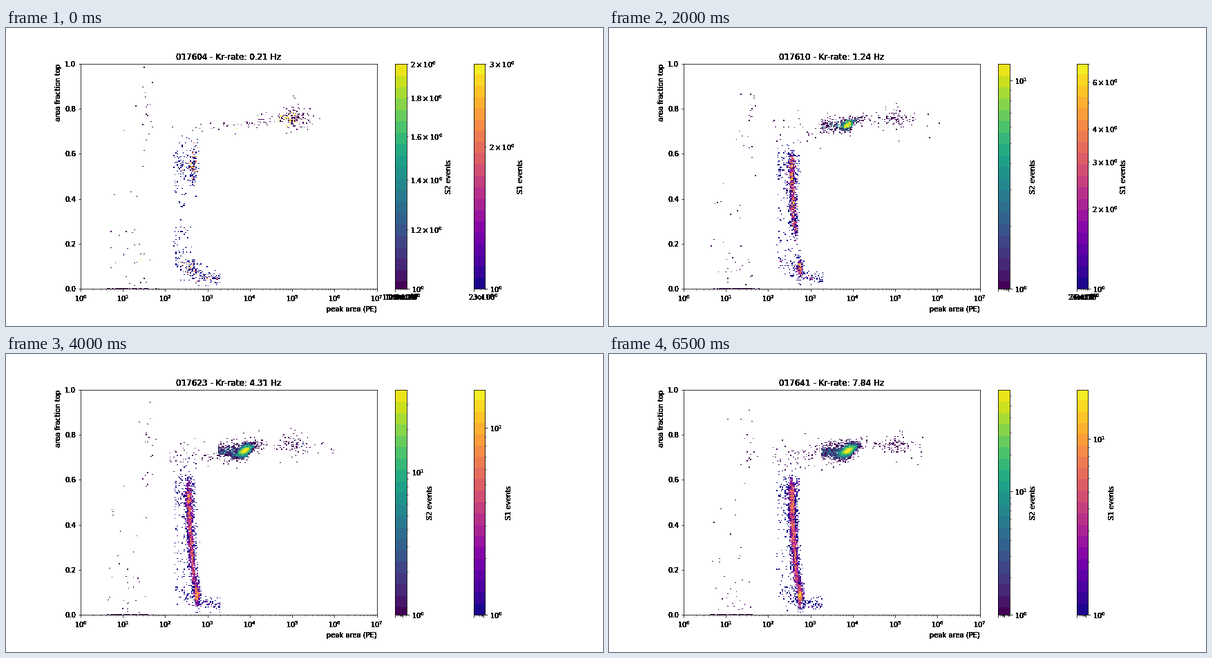
A matplotlib script for the animation above (7000 ms loop, 864x432 px).

```python
import numpy as np
import matplotlib.pyplot as plt
from matplotlib.animation import FuncAnimation
from matplotlib.text import Text

W, H = 864, 432
FRAMES, STEP = 14, 500
BINS = 250

plt.rcParams.update({"font.family": "DejaVu Sans", "font.size": 10})

# Key moments: run number, rate and the largest count in each histogram
KEYS = [0, 1, 2, 4, 6, 8, 10, 13]
RUN = [17604, 17605, 17607, 17610, 17616, 17623, 17629, 17641]
RATE = [.21, .25, .43, 1.24, 2.64, 4.31, 5.83, 7.84]
TOP_S2 = [2, 2, 5, 12, 29, 38, 55, 67]
TOP_S1 = [3, 3, 4, 7, 14, 16, 21, 19]


def top_count(tops, i):
    """Largest count, growing geometrically between key moments."""
    return int(np.exp(np.interp(i, KEYS, np.log(tops))) + 0.01)


def solid(img, dpi):
    """Hard-edged text: every touched pixel becomes opaque."""
    img[..., 3] = img[..., 3] > 0.06
    return img, 0, 0


class Sampler:
    """Seeded point clouds; x is log10(area), y the area fraction."""

    def __init__(self, seed):
        self.rng = np.random.default_rng(seed)

    def noise(self, n, sd):
        """Bell curve with a sharp core and a wide halo."""
        return self.rng.normal(0, sd, n) * self.rng.uniform(0.4, 1.6, n)

    def cloud(self, n, x, sx, y, sy, tilt=0):
        n = int(n)
        dx = self.noise(n, sx)
        return x + dx, y + tilt * dx + self.noise(n, sy)

    def box(self, n, x0, x1, y0, y1):
        n = int(n)
        return self.rng.uniform(x0, x1, n), self.rng.uniform(y0, y1, n)

    def band(self, n, x0, x1, y0, y1, sy):
        """Points along a straight line with vertical spread."""
        t = self.rng.uniform(0, 1, int(n))
        return x0 + (x1 - x0) * t, y0 + (y1 - y0) * t + self.noise(t.size, sy)

    def column(self, n, low):
        u = self.rng.uniform(0, 1, int(n)) ** 0.85
        y = low + (0.58 - low) * u + self.rng.normal(0, 0.022, u.size)
        x = 2.525 + 0.3 * np.exp(-4.2 * y) + 0.015 * (0.6 - y)
        return x + self.noise(u.size, 0.043), y

    def floor(self):
        """Broken row of single events at zero."""
        x = np.arange(0.62, 1.85, 7 / BINS)
        keep = self.rng.uniform(0, 1, x.size) < np.where(x < 1.58, 0.8, 0.2)
        return x[keep], np.zeros(keep.sum())


def s1_points(s, rate):
    gain = max(rate - 0.25, 0)
    early = np.exp(-4 * (rate - 0.21))
    low = 0.1 + 0.36 * np.exp(-gain)
    return [
        s.column(900 * gain ** 0.5, low),
        s.cloud(175 * gain ** 0.5, 2.75, 0.036, 0.087, 0.023),
        s.cloud(120 * early, 2.66, 0.05, 0.55, 0.045),
        s.cloud(90 * early, 2.65, 0.14, 0.085, 0.022, -0.06),
        s.band(115, 2.2, 2.75, 0.54, 0.55, 0.055),
        s.box(42, 2.2, 2.6, 0.16, 0.45),
        s.band(60, 2.25, 2.75, 0.12, 0.08, 0.028),
        s.band(60, 2.8, 3.3, 0.055, 0.042, 0.012),
    ]


def s2_points(s, rate):
    gain = max(rate - 0.25, 0)
    early = np.exp(-4 * (rate - 0.21))
    return [
        s.cloud(580 * gain ** 0.9, 3.88, 0.095, 0.728, 0.0105, 0.085),
        s.band(260 * gain ** 0.5, 3.25, 3.95, 0.722, 0.728, 0.0155),
        s.cloud(85 + 75 * early, 5.04, 0.2, 0.757, 0.022),
        s.band(28, 3.9, 5.0, 0.735, 0.765, 0.016),
        s.band(24 * early, 3.0, 4.6, 0.71, 0.75, 0.012),
        s.band(10 + 22 * gain ** 0.5, 2.1, 3.3, 0.695, 0.71, 0.032),
        s.box(4 * (1 - early), 5.5, 6.1, 0.66, 0.78),
        s.cloud(16, 1.58, 0.08, 0.76, 0.1),
        s.box(5, 1.0, 1.7, 0.5, 0.9),
        s.box(15, 0.65, 1.4, 0.02, 0.48),
        s.box(15, 1.0, 1.65, 0.01, 0.17),
        s.floor(),
    ]


def paint(img, parts, cmap, top):
    x, y = np.concatenate(parts, axis=1)
    n = np.histogram2d(y, x, BINS, [[0, 1], [0, 7]])[0]
    hit = n > 0
    img[hit] = cmap(np.log(n[hit]) / np.log(top), bytes=True)


def ten(k, factor=None):
    lead = "" if factor is None else rf"{factor:g}\times"
    return rf"$\mathdefault{{{lead}10^{{{k}}}}}$"


def scale_bar(cax, top):
    """Log ticks from 1 to top on the bar, with small ones below it too."""
    span = np.log10(top)
    majors = [k for k in (0, 1) if k <= span]
    if span < 0.4:
        minors = named = [1 + k / 5 for k in range(1, 6)]
    else:
        minors = [m * s for s in (1, 10) for m in range(2, 10) if m * s <= top]
        named = [2, 3, 4, 6] if span < 1 else []
    names = [ten(0, m) if m in named else "" for m in minors]
    spots = np.log10(minors) / span
    major_spots = np.array(majors) / span
    cax.set_yticks(major_spots, [ten(k) for k in majors])
    cax.set_xticks(major_spots, [""] * len(majors))
    cax.set_yticks(spots, names, minor=True)
    cax.set_xticks(spots, names, minor=True)
    cax.set(xlim=(0, 1), ylim=(0, 1))


def make_bar(fig, left, cmap, label, step, shift):
    cax = fig.add_axes([left, 0.125, 0.755 * H / 20 / W, 0.755])
    rows = np.arange(326) + 0.5
    mid = (np.floor((rows + shift) / step) + 0.5) * step - shift
    colors = cmap(np.clip(mid / 326, 0, 1))
    cax.imshow(colors[:, None, :], origin="lower", aspect="auto",
               extent=[0, 1, 0, 1], interpolation="nearest")
    cax.yaxis.tick_right()
    cax.yaxis.set_label_position("right")
    cax.set_ylabel(label)
    return cax


viridis, plasma = plt.get_cmap("viridis"), plt.get_cmap("plasma")
fig = plt.figure(figsize=(W / 72, H / 72), dpi=72, facecolor="white")

# Each bar takes its share of the width that is left
full = 0.775
ax = fig.add_axes([0.125, 0.125, full * 0.64, 0.755])
plot = ax.imshow(np.zeros((BINS, BINS, 4), np.uint8), origin="lower",
                 aspect="auto", extent=[0, 7, 0, 1], interpolation="nearest")
ax.set_xticks(range(8), [ten(k) for k in range(8)])
ax.set_xticks([k + np.log10(m) for k in range(7) for m in range(2, 10)],
              minor=True)
ax.set_yticks(np.arange(6) / 5, [f"{k / 5:.1f}" for k in range(6)])
ax.set(xlim=(0, 7), ylim=(0, 1))
ax.set_xlabel("peak area (PE)", loc="right")
ax.set_ylabel("area fraction top", loc="top")
title = ax.set_title("", fontsize=12)
bar_s2 = make_bar(fig, 0.125 + full * 0.68, viridis, "S2 events", 16.5, 5.5)
bar_s1 = make_bar(fig, 0.125 + full * 0.85, plasma, "S1 events", 16.3, 0)


def draw(i):
    sampler = Sampler(100 + i)
    rate = np.interp(i, KEYS, RATE)
    top_s1, top_s2 = top_count(TOP_S1, i), top_count(TOP_S2, i)
    img = np.zeros((BINS, BINS, 4), np.uint8)
    paint(img, s1_points(sampler, rate), plasma, top_s1)
    paint(img, s2_points(sampler, rate), viridis, top_s2)
    plot.set_data(img)
    run = int(np.interp(i, KEYS, RUN))
    title.set_text(f"{run:06d} - Kr-rate: {rate:.2f} Hz")
    scale_bar(bar_s2, top_s2)
    scale_bar(bar_s1, top_s1)
    for text in fig.findobj(Text):
        text.set_agg_filter(solid)
    return []


anim = FuncAnimation(fig, draw, frames=FRAMES, interval=STEP,
                     init_func=lambda: draw(0), repeat=True, repeat_delay=0)
plt.show()
```
